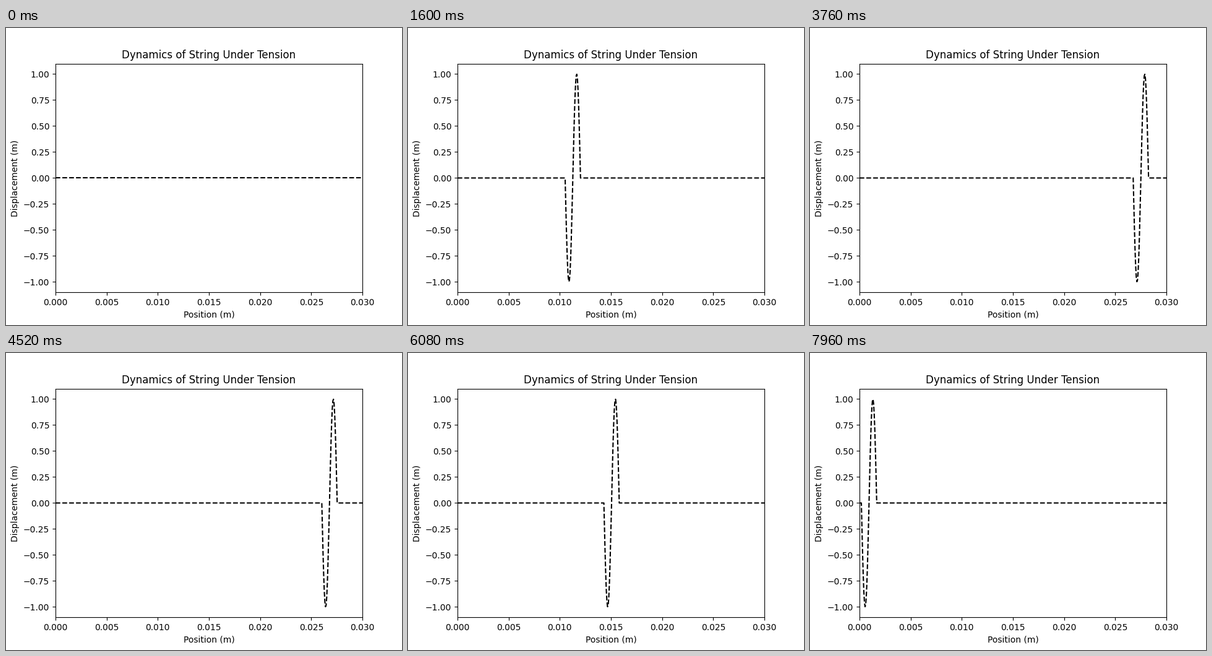
Animation of 640x480 px, one loop 8000 ms. Source, as a matplotlib script:

```python
import numpy as np
import matplotlib.pyplot as plt
from matplotlib.animation import FuncAnimation

LENGTH = 0.03          # string length (m)
NODES = 500            # grid points along the string
STEPS_PER_FRAME = 5    # grid cells the wave crosses per frame
PERIOD = 25            # duration of the driving pulse, in steps
FRAMES = 200

node = np.arange(NODES)
x = np.linspace(0, LENGTH, NODES)


def pulse(s):
    """One sine cycle, zero outside it."""
    return np.where((s > 0) & (s < PERIOD), np.sin(2 * np.pi * s / PERIOD), 0.0)


def displacement(step):
    """Travelling pulse plus its inverted reflection from the fixed end."""
    round_trip = 2 * (NODES - 1)
    return pulse(step - node) - pulse(step - round_trip + node)


fig, ax = plt.subplots(figsize=(6.4, 4.8), dpi=100)
line, = ax.plot(x, displacement(0), "k--", lw=1.5)
ax.set_xlim(0, LENGTH)
ax.set_ylim(-1.1, 1.1)
ax.set_title("Dynamics of String Under Tension")
ax.set_xlabel("Position (m)")
ax.set_ylabel("Displacement (m)")


def update(frame):
    line.set_ydata(displacement(frame * STEPS_PER_FRAME))
    return line,


anim = FuncAnimation(fig, update, frames=FRAMES, interval=40, repeat=True)
plt.show()
```
